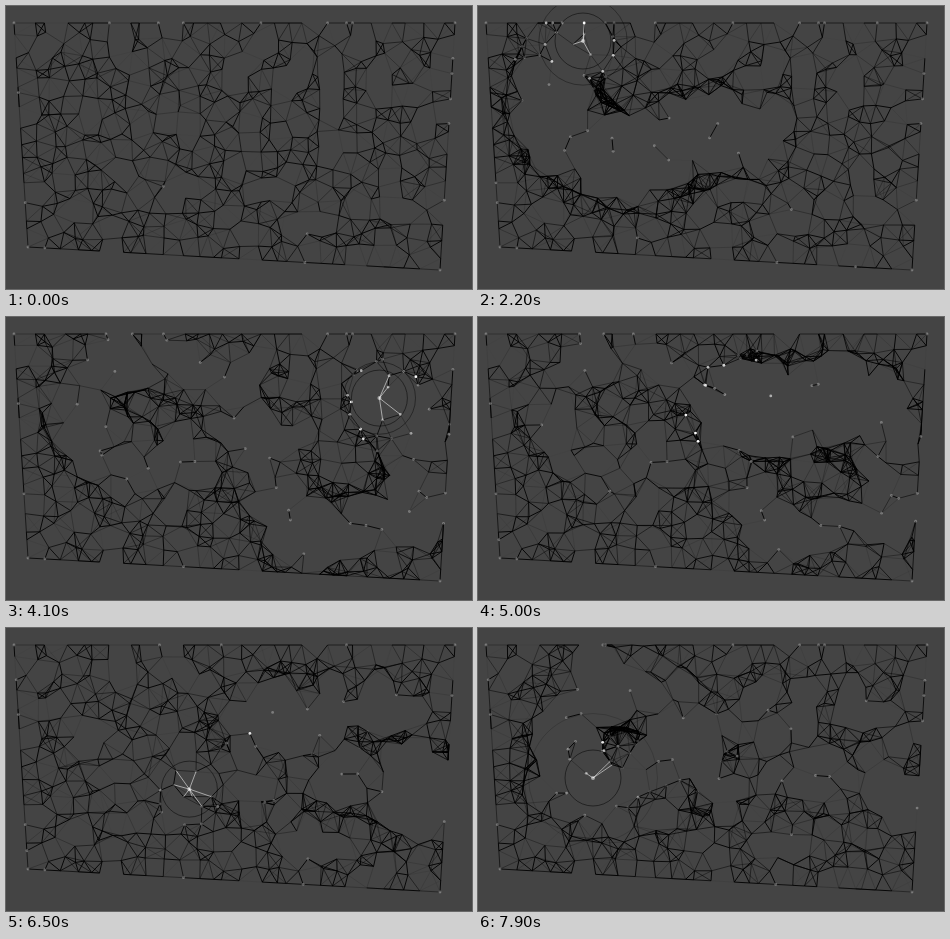
These frames come from a looping animation (466 px wide and 283 px high, 8000 ms). An HTML page with a canvas:

```html
<!DOCTYPE html>
<html>
<head>
<meta charset="utf-8">
<style>
html, body { margin: 0; width: 100%; height: 100%; overflow: hidden; background: #444; }
canvas { display: block; }
</style>
</head>
<body>
<canvas id="stage" width="466" height="283"></canvas>
<script>
const ctx = document.getElementById('stage').getContext('2d');
const STEP = 100, STEPS = 80, COLS = 28, ROWS = 16;
const LINK = 24, REACH = 45, SPOKE = 27, RING = 28;

let seed = 4711;
const rnd = () => (seed = (seed * 16807) % 2147483647) / 2147483647;
const clamp = (v, lo, hi) => Math.max(lo, Math.min(hi, v));
const mix = (a, b, k) => a + (b - a) * k;
const dist = (a, b) => Math.hypot(a.x - b.x, a.y - b.y);

// The pointer sweeps twice, along smooth curves through evenly timed points
const sweeps = [
  { from: 400, gap: 450, show: 400, path: [[285, 130], [215, 125], [147, 157], [75, 110], [105, 35],
    [230, 75], [297, 219], [420, 185], [388, 86], [310, 95], [250, 85]] },
  { from: 5500, gap: 400, show: 6000, path: [[425, 170], [410, 160], [285, 140], [100, 170],
    [121, 52], [216, 110], [115, 150]] }
];

function spline(path, at) {
  const i = Math.min(Math.floor(at), path.length - 2), k = at - i;
  const [a, b, c, d] = [-1, 0, 1, 2].map(o => path[clamp(i + o, 0, path.length - 1)]);
  const axis = n => b[n] + k / 2 * (c[n] - a[n] + k * (2 * a[n] - 5 * b[n] + 4 * c[n] - d[n]
    + k * (3 * (b[n] - c[n]) + d[n] - a[n])));
  return { x: axis(0), y: axis(1) };
}

function pointerAt(t) {
  for (const { from, gap, show, path } of sweeps) {
    const at = (t - from) / gap;
    if (at < 0 || at > path.length - 1) continue;
    const p = spline(path, at);
    const speed = dist(p, spline(path, Math.max(0, at - STEP / gap)));
    // The outer ring widens with speed
    return { ...p, ring: RING + 3.4 * Math.max(0, speed - 13), visible: t >= show };
  }
  return null;
}

// Keeps a point inside the slanted sheet
function confine(p) {
  p.y = clamp(p.y, 17, 241 + 23 * (p.x - 22) / 412);
  p.x = clamp(p.x, 8 + 14 * (p.y - 17) / 224, 449 - 15 * (p.y - 17) / 247);
}

function makePoints() {
  const list = [];
  for (let r = 0; r < ROWS; r++)
    for (let c = 0; c < COLS; c++) {
      const sideX = c % (COLS - 1) === 0, sideY = r % (ROWS - 1) === 0;
      const u = (c + (sideX ? 0 : .85 * (rnd() - .5))) / (COLS - 1);
      const v = (r + (sideY ? 0 : .85 * (rnd() - .5))) / (ROWS - 1);
      const x = mix(mix(8, 449, u), mix(22, 434, u), v);
      const y = mix(17, mix(241, 264, u), v);
      list.push({
        hx: x, hy: y, x, y, vx: 0, vy: 0,
        pull: mix(.008, .028, rnd()), push: mix(3, 7, rnd()),
        phase: rnd() * 6.28, rate: mix(.05, .13, rnd()), sway: sideX || sideY ? 0 : 3
      });
    }
  return list;
}

function advance(p, n, pointer) {
  const a = p.phase + n * p.rate;
  p.vx += (p.hx + p.sway * Math.cos(a) - p.x) * p.pull;
  p.vy += (p.hy + p.sway * Math.sin(a) - p.y) * p.pull;
  const d = pointer ? dist(p, pointer) || 1 : REACH;
  if (d < REACH) {
    const force = p.push * Math.sin(Math.PI * d / REACH) / d;
    p.vx += (p.x - pointer.x) * force;
    p.vy += (p.y - pointer.y) * force;
  }
  p.vx *= .75;
  p.vy *= .75;
  p.x += p.vx;
  p.y += p.vy;
  confine(p);
}

const points = makePoints(), states = [];
for (let n = 0; n < STEPS; n++) {
  const pointer = pointerAt(n * STEP);
  if (n) points.forEach(p => advance(p, n, pointer));
  states.push(points.map(p => ({ x: p.x, y: p.y, speed: Math.hypot(p.vx, p.vy) })));
}

function line(a, b, color) {
  ctx.strokeStyle = color;
  ctx.beginPath();
  ctx.moveTo(a.x, a.y);
  ctx.lineTo(b.x, b.y);
  ctx.stroke();
}

function circle(p, r) {
  ctx.beginPath();
  ctx.arc(p.x, p.y, r, 0, 7);
}

function drawMesh(list) {
  const links = list.map(() => 0);
  list.forEach((a, i) => {
    for (let j = i + 1; j < list.length; j++) {
      const d = dist(a, list[j]);
      if (d >= LINK) continue;
      links[i]++;
      links[j]++;
      line(a, list[j], `rgba(0,0,0,${Math.min(1, (LINK - d) / 8)})`);
    }
  });
  // Lonely and fast points light up
  list.forEach((p, i) => {
    const light = Math.min(1, (links[i] < 4 ? .3 : 0) + Math.max(0, p.speed - 2) / 6);
    if (light < .1) return;
    ctx.fillStyle = `rgba(255,255,255,${light})`;
    circle(p, 1.4);
    ctx.fill();
  });
}

function drawPointer(pointer, list) {
  for (const p of list)
    if (dist(p, pointer) < SPOKE) line(pointer, p, 'rgba(255,255,255,.6)');
  ctx.fillStyle = 'rgba(255,255,255,.5)';
  circle(pointer, 2);
  ctx.fill();
  for (const r of [RING, pointer.ring]) {
    ctx.strokeStyle = `rgba(0,0,0,${.55 - (r - RING) / 100})`;
    circle(pointer, r);
    ctx.stroke();
  }
}

function draw(n) {
  const pointer = pointerAt(n * STEP);
  ctx.fillStyle = '#444';
  ctx.fillRect(0, 0, 466, 283);
  ctx.lineWidth = .9;
  drawMesh(states[n]);
  if (pointer && pointer.visible) drawPointer(pointer, states[n]);
}

let shown = -1;
const start = performance.now();
function tick() {
  const n = Math.floor(Math.max(0, performance.now() - start) / STEP) % STEPS;
  if (n !== shown) draw(shown = n);
  requestAnimationFrame(tick);
}
tick();
</script>
</body>
</html>
```
